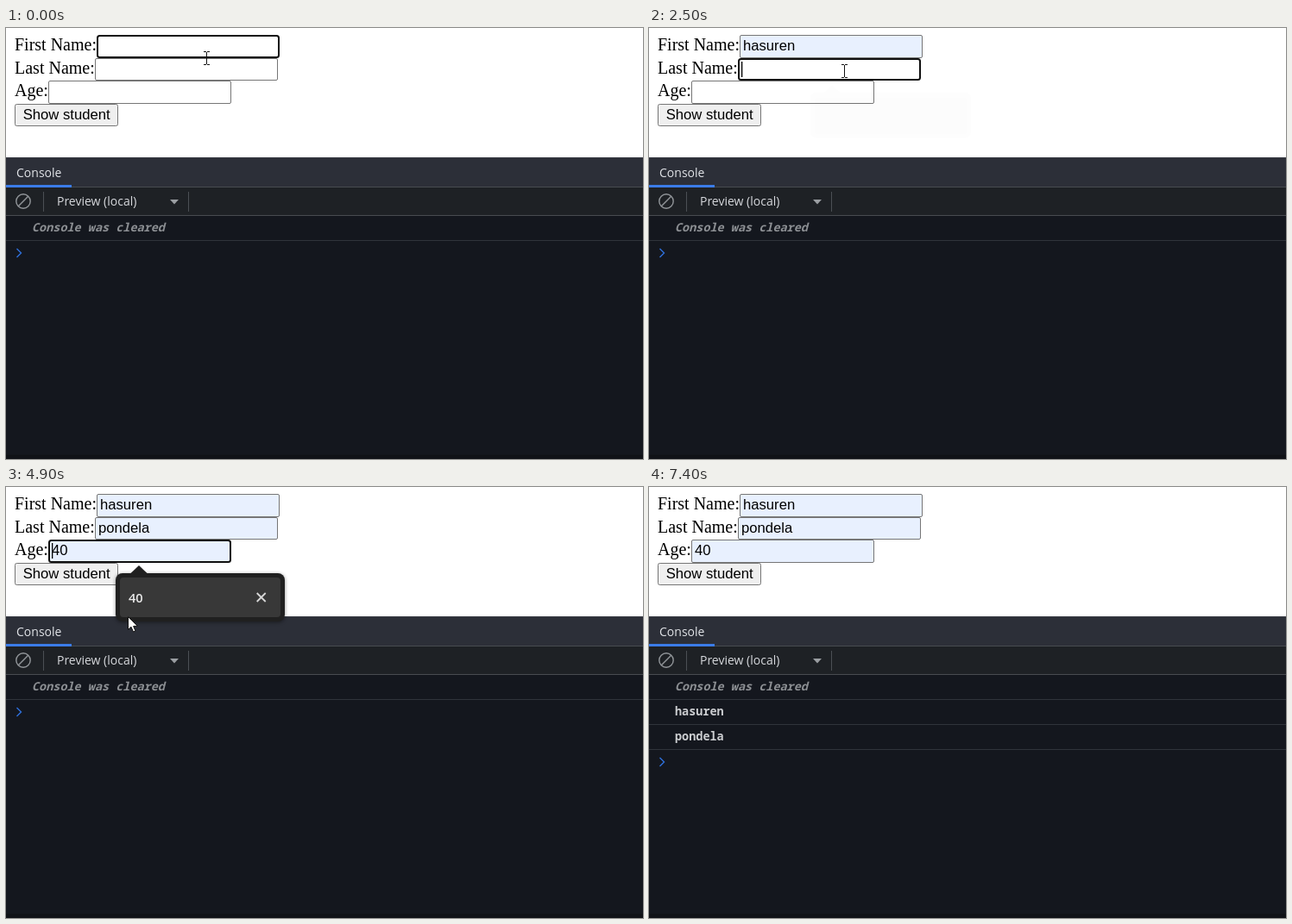
Write an HTML page with a canvas that moves like this. It is 738x500 px and loops after 7.5 s.

```html
<!DOCTYPE html>
<html lang="en">
<head>
<meta charset="utf-8">
<title>Student form</title>
<style>
html, body { margin: 0; width: 738px; height: 500px; overflow: hidden; background: #fff; }
canvas { display: block; }
</style>
</head>
<body>
<canvas id="stage" width="738" height="500"></canvas>
<script>
const ctx = document.getElementById('stage').getContext('2d');
const LOOP = 7500, PRESS = 6300, LOG = 6500, LEAVE = 7300;

const SERIF = '20px "Liberation Serif", serif';
const ARIAL = '16.67px "Liberation Sans", sans-serif';
const UI = '14px "Open Sans", sans-serif';
const UI_BOLD = '600 14.6px "Open Sans", sans-serif';
const MONO = '600 13.5px "Noto Sans Mono", monospace';

// focus, open and fill are times in ms; px, py place the suggestion popup
const fields = [
  { label: 'First Name:', value: 'hasuren', x: 105, y: 8, h: 27, focus: 0, blink: 400, open: 500, fill: 1580, px: 183, py: 46 },
  { label: 'Last Name:', value: 'pondela', x: 103, y: 35, h: 26, focus: 2350, blink: 2350, open: 2500, fill: 3150, px: 182, py: 73 },
  { label: 'Age:', value: '40', x: 49, y: 61, h: 27, focus: 3850, blink: 3850, open: 3920, fill: 5150, px: 127, py: 100 }
];
const FIELD_W = 212, POP_W = 196, POP_H = 56;

// time, x, y of the pointer
const path = [
  [0, 232, 35], [350, 229, 28], [600, 228, 28], [1000, 228, 37], [1400, 231, 66],
  [1850, 231, 66], [2250, 228, 48], [2550, 226, 50], [3000, 218, 105], [3250, 218, 105],
  [3700, 150, 78], [4050, 149, 82], [4500, 141, 150], [5150, 141, 150],
  [5550, 51, 84], [5750, 51, 84], [6200, 105, 97], [LOOP, 105, 97]
];

const clamp = v => Math.max(0, Math.min(1, v));
const inside = (p, x, y, w, h) => p.x >= x && p.x < x + w && p.y >= y && p.y < y + h;

function pointerAt(t) {
  const i = path.findIndex(k => k[0] > t);
  const [t0, x0, y0] = path[i - 1], [t1, x1, y1] = path[i];
  const u = (t - t0) / (t1 - t0), e = u * u * (3 - 2 * u);
  return { x: x0 + (x1 - x0) * e, y: y0 + (y1 - y0) * e };
}

function rect(x, y, w, h, color) {
  ctx.fillStyle = color;
  ctx.fillRect(x, y, w, h);
}

function text(s, x, y, font, color) {
  ctx.font = font;
  ctx.fillStyle = color;
  ctx.fillText(s, x, y);
}

function line(points, color, width) {
  ctx.beginPath();
  points.forEach(([x, y]) => ctx.lineTo(x, y));
  ctx.strokeStyle = color;
  ctx.lineWidth = width;
  ctx.stroke();
}

function poly(points, color) {
  ctx.beginPath();
  points.forEach(([x, y]) => ctx.lineTo(x, y));
  ctx.closePath();
  ctx.fillStyle = color;
  ctx.fill();
}

// bordered box whose border lies inside the given size
function box(x, y, w, h, r, fill, stroke, width) {
  ctx.beginPath();
  ctx.roundRect(x + width / 2, y + width / 2, w - width, h - width, r);
  ctx.fillStyle = fill;
  ctx.fill();
  ctx.strokeStyle = stroke;
  ctx.lineWidth = width;
  ctx.stroke();
}

function popupAlpha(f, t) {
  return clamp((t - f.open) / 150) * (1 - clamp((t - f.fill - 35) / 200));
}

function isHovered(f, t, p) {
  return t >= f.fill || t > f.open && inside(p, f.px + 5, f.py + 5, POP_W - 10, POP_H - 10);
}

function drawField(f, i, t, p, covered) {
  const end = i < 2 ? fields[i + 1].focus : PRESS;
  const focused = t >= f.focus && t < end;
  const shown = isHovered(f, t, p);
  const hover = !covered && inside(p, f.x, f.y, FIELD_W, f.h);
  const base = f.y + 18;
  text(f.label, 10, base, SERIF, '#000');
  if (!focused) {
    box(f.x, f.y, FIELD_W, f.h, 1.5, shown ? '#e8f0fe' : '#fff', hover ? '#444' : '#767676', 1);
  }
  else box(f.x, f.y, FIELD_W, f.h, 2.5, shown ? '#e8f0fe' : '#fff', '#101010', 2);
  if (shown) text(f.value, f.x + 4, base, ARIAL, '#000');

  const filled = t >= f.fill;
  const since = t - (filled ? f.fill : f.blink);
  if (focused && since >= 0 && since % 1000 < 500) {
    ctx.font = ARIAL;
    const w = filled && i < 2 ? Math.round(ctx.measureText(f.value).width) : 0;
    rect(f.x + 4 + w, f.y + 4, 1.3, 18, '#000');
  }
}

function drawButton(t, p) {
  const hover = t < LEAVE && inside(p, 10, 88, 120, 26);
  const pressed = t >= PRESS && t < LOG;
  box(10, 88, 120, 26, 2, pressed ? '#f5f5f5' : hover ? '#e5e5e5' : '#efefef', hover ? '#4f4f4f' : '#767676', 1);
  text('Show student', 19.7, 106, ARIAL, '#000');
}

function drawConsole(t) {
  rect(0, 150, 738, 350, '#14171e');
  rect(0, 150, 738, 34, '#2c2f38');
  rect(0, 150, 738, 1, '#3a3d45');
  rect(0, 184, 738, 1, '#484c50');
  rect(0, 182, 76, 3, '#3b7ce8');
  text('Console', 12, 173, UI, '#e2e4e8');

  rect(0, 185, 738, 32, '#1e2125');
  rect(0, 217, 738, 1, '#484c50');
  ctx.beginPath();
  ctx.arc(20, 201, 8.2, 0, Math.PI * 2);
  ctx.strokeStyle = '#92969a';
  ctx.lineWidth = 1.4;
  ctx.stroke();
  line([[14.3, 206.7], [25.7, 195.3]], '#92969a', 1.4);
  rect(43, 190, 1, 23, '#4b4f54');
  rect(211, 190, 1, 23, '#4b4f54');
  text('Preview (local)', 59, 206, UI, '#d6d8dc');
  poly([[190, 199], [200, 199], [195, 204.5]], '#9a9ea2');

  text('Console was cleared', 30, 236, 'italic ' + MONO, '#8c8f93');
  rect(0, 246, 738, 1, '#30343b');
  let y = 261;
  if (t >= LOG) {
    for (const f of fields.slice(0, 2)) {
      text(f.value, 30, y + 4, MONO, '#cbcdd0');
      rect(0, y + 14, 738, 1, '#30343b');
      y += 29;
    }
  }
  line([[12.5, y - 5], [17.5, y], [12.5, y + 5]], '#2f70dc', 1.4);
  rect(0, 495, 738, 5, '#101217');
}

function drawPopup(f, t, p) {
  const alpha = popupAlpha(f, t);
  if (!alpha) return;
  const { px: x, py: y } = f, cx = x + POP_W / 2, cy = y + POP_H / 2;
  const scale = 0.953 + 0.047 * alpha;
  ctx.save();
  ctx.globalAlpha = alpha;
  ctx.translate(cx, cy);
  ctx.scale(scale, scale);
  ctx.translate(-cx, -cy);
  ctx.save();
  ctx.shadowColor = 'rgba(0,0,0,.45)';
  ctx.shadowBlur = 4;
  ctx.shadowOffsetY = 1;
  ctx.beginPath();
  ctx.roundRect(x, y, POP_W, POP_H, 8);
  ctx.fillStyle = '#202020';
  ctx.fill();
  ctx.restore();
  poly([[x + 17, y + 0.5], [x + 27, y - 9], [x + 37, y + 0.5]], '#202020');
  if (isHovered(f, t, p)) {
    ctx.beginPath();
    ctx.roundRect(x + 5, y + 5, POP_W - 10, POP_H - 10, 4);
    ctx.fillStyle = '#383838';
    ctx.fill();
    const bx = x + 168.7, by = y + 28;
    line([[bx - 5, by - 5], [bx + 5, by + 5]], '#d8d8d8', 1.8);
    line([[bx - 5, by + 5], [bx + 5, by - 5]], '#d8d8d8', 1.8);
  }
  text(f.value, x + 15, y + 33.5, UI_BOLD, '#e8e8e8');
  ctx.restore();
}

function drawPointer(p, covered) {
  const x = Math.round(p.x), y = Math.round(p.y);
  ctx.save();
  ctx.translate(x, y);
  if (!covered && fields.some(f => inside(p, f.x, f.y, FIELD_W, f.h))) {
    rect(0, -7, 1, 14, '#111');
    for (const side of [-8, 7]) {
      rect(-3, side, 3, 1, '#111');
      rect(1, side, 3, 1, '#111');
    }
  } else {
    const arrow = [[0.5, 0.5], [0.5, 15.5], [4, 12.3], [6.5, 18], [9, 17], [6.6, 11.5], [11.3, 11.2]];
    poly(arrow, '#fff');
    line([...arrow, arrow[0]], '#111', 1);
  }
  ctx.restore();
}

function draw(t) {
  const p = pointerAt(t);
  const covered = fields.some(f => popupAlpha(f, t) > 0 && p.y > f.py - 10);
  rect(0, 0, 738, 500, '#fff');
  fields.forEach((f, i) => drawField(f, i, t, p, covered));
  drawButton(t, p);
  drawConsole(t);
  fields.forEach(f => drawPopup(f, t, p));
  if (t < LEAVE) drawPointer(p, covered);
}

function frame() {
  draw(performance.now() % LOOP);
  requestAnimationFrame(frame);
}
frame();
</script>
</body>
</html>
```
